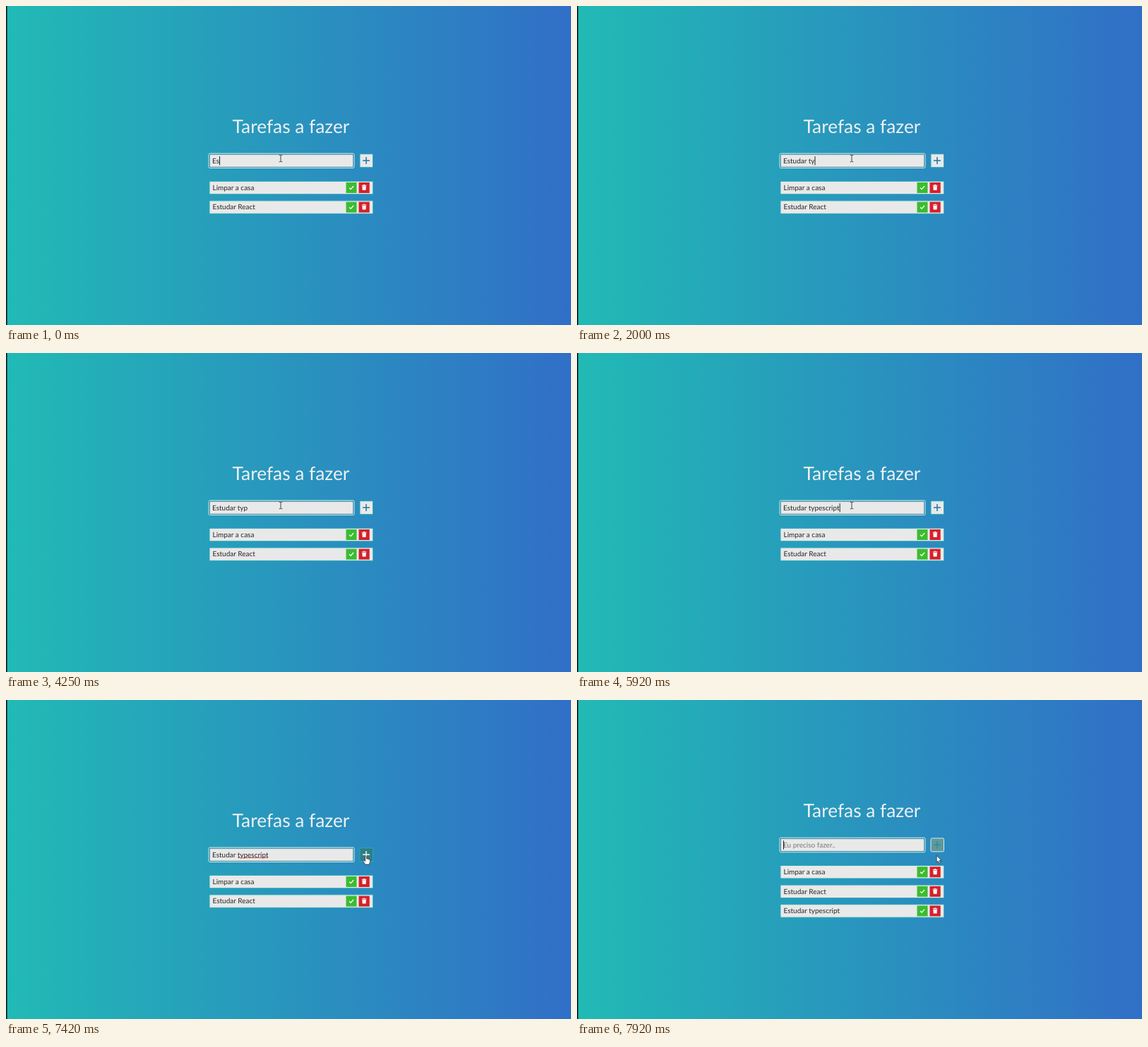
Recreate the animation shown at these times as an HTML page. Size 800 by 452 pixels, loop 8 s.

```html
<!DOCTYPE html>
<html lang="pt">
<head>
<meta charset="utf-8">
<title>Tarefas a fazer</title>
<style>
  html, body { margin: 0; width: 100%; height: 100%; overflow: hidden; }
  body { background: linear-gradient(to right, #21bab5, #316fc7); }
  svg { display: block; width: 800px; height: 452px; }
  text { font: 10px Lato, "Open Sans", sans-serif; fill: #262626; white-space: pre; text-rendering: geometricPrecision; }
  #title { font-size: 26.3px; fill: #eef1f2; text-anchor: middle; }
  .icon { fill: none; stroke: #fff; }
</style>
</head>
<body>
<svg viewBox="0 0 800 452">
  <rect width="1.6" height="452" fill="#06191c"/>
  <g id="app">
    <text id="title" x="403.5" y="179.5">Tarefas a fazer</text>
    <rect x="287.5" y="209" width="205" height="20.5" fill="#e9e9e9" stroke="#23a9b5" stroke-width=".8"/>
    <g id="ring" fill="none">
      <rect x="287" y="209" width="206" height="20.5" rx="1.5" stroke="#d9eeee"/>
      <rect x="288.2" y="210.2" width="203.6" height="18.2" stroke="#287f9c"/>
    </g>
    <text id="entry" x="292" y="222.6"></text>
    <path id="spell" d="M328 223.6H371" stroke="#d8484c" stroke-width=".9"/>
    <rect id="caret" y="213" width="1" height="12.5" fill="#222"/>
    <rect id="button" x="501" y="209.7" width="18.5" height="19" stroke-width="1"/>
    <path id="plus" d="M505 219H515M510 214V224" stroke-width="1.5"/>
    <g id="list"></g>
  </g>
  <g id="pointer">
    <path id="beam" d="M-2.3 -4.8Q-.2 -4.8 0 -4Q.2 -4.8 2.3 -4.8M0 -4V4M-2.3 4.8Q-.2 4.8 0 4Q.2 4.8 2.3 4.8" fill="none" stroke="#333" stroke-width=".9"/>
    <path id="arrow" d="M-.8 0V9.6L1.4 7.6L2.9 10.9L4.5 10.2L3 7H6Z" fill="#fff" stroke="#222" stroke-width=".7"/>
    <path id="hand" d="M-1 6V.8Q0 -.6 1 .8V4Q2.2 3.4 2.8 4.4Q4 4 4.4 5Q5.7 4.8 5.8 6.2V8.5L4.6 12H-1L-3.8 7.5Q-4.2 5.8 -2.8 6L-1 7.6Z" fill="#fff" stroke="#222" stroke-width=".7"/>
  </g>
</svg>
<script>
const LOOP = 8000, ADDED = 7915;
const el = id => document.getElementById(id);
const set = (id, attrs) => { for (const k in attrs) el(id).setAttribute(k, attrs[k]); };
const show = (id, on) => set(id, { visibility: on ? 'visible' : 'hidden' });
const clamp = v => Math.min(1, Math.max(0, v));

el('list').innerHTML = ['Limpar a casa', 'Estudar React', 'Estudar typescript'].map((label, i) => `
  <g id="item${i}" transform="translate(0 ${i * 27.6})">
    <rect x="288" y="248.3" width="231.7" height="18.4" fill="#e9e9e9" stroke="#23a9b5" stroke-width=".9"/>
    <text x="292.5" y="260.9">${label}</text>
    <rect x="481.5" y="250" width="15" height="15" fill="#3cbc30"/>
    <path class="icon" d="M486 257.6L488.1 259.6L492.1 255.2" stroke-width="1.3"/>
    <rect x="499.5" y="250" width="15.2" height="15" fill="#d5202a"/>
    <path class="icon" d="M503.8 254.3H510.4M506 253.5H508.2" stroke-width="1"/>
    <path d="M504.3 255.3H509.9L509.5 261H504.7Z" fill="#fff"/>
  </g>`).join('');

// [start, text, caret visible]
const typing = [
  [0, 'Es', 1], [80, 'Est', 1], [250, 'Estu', 1], [500, 'Estud', 1], [580, 'Estuda', 1],
  [830, 'Estudar', 1], [1000, 'Estudar ', 1], [1500, 'Estudar ', 0], [1750, 'Estudar t', 1],
  [2000, 'Estudar ty', 1], [2250, 'Estudar typ', 1], [2670, 'Estudar type', 1],
  [3250, 'Estudar type', 0], [3580, 'Estudar typ', 0], [3750, 'Estudar typ', 1],
  [4250, 'Estudar typ', 0], [4500, 'Estudar type', 1], [4750, 'Estudar types', 1],
  [5000, 'Estudar typescr', 1], [5170, 'Estudar typesc', 1], [5500, 'Estudar typescri', 1],
  [5750, 'Estudar typescrip', 1], [5920, 'Estudar typescript', 1], [6420, 'Estudar typescript', 0],
  [ADDED, '', 1]
];

// [time, x, y]
const path = [
  [0, 389, 216], [6667, 389, 216], [6750, 400, 216], [6917, 465, 216.5], [7000, 488, 217.5],
  [7083, 501, 219.5], [7250, 509, 222], [7500, 510, 220.5], [LOOP, 510, 220.5]
];

function pointerAt(t) {
  const i = path.findIndex(p => p[0] > t), a = path[i - 1], b = path[i];
  const k = (t - a[0]) / (b[0] - a[0]);
  return [a[1] + (b[1] - a[1]) * k, a[2] + (b[2] - a[2]) * k];
}

function mix(a, b, k) {
  return `rgb(${a.map((v, i) => Math.round(v + (b[i] - v) * k))})`;
}

function draw(t) {
  const [, text, caret] = typing.findLast(s => s[0] <= t);
  const added = t >= ADDED, pressed = t >= 7660;
  const entry = el('entry');
  entry.textContent = text;
  set('caret', { x: 292 + entry.getComputedTextLength() });
  if (added) {
    entry.textContent = 'Eu preciso fazer..';
  }
  entry.style.fill = added ? '#777' : '#262626';
  show('caret', caret);
  show('ring', !pressed || added);
  show('spell', t >= 6745 && !pressed);
  show('item2', added);
  set('app', { transform: `translate(0 ${added ? -13.8 : 0})` });

  const hover = added ? .75 : clamp((t - 7070) / 200);
  set('button', {
    fill: mix([233, 233, 233], [47, 126, 133], hover),
    stroke: pressed ? '#dcebea' : '#23a9b5',
    rx: pressed ? 1.5 : 0
  });
  set('plus', { stroke: added ? '#2c8f96' : mix([33, 116, 166], [245, 250, 250], hover) });

  const [x, y] = pointerAt(Math.floor((t + 5) * .012) / .012);
  set('pointer', { transform: `translate(${x} ${y})` });
  const shape = x < 493 ? 'beam' : x < 500 || added ? 'arrow' : 'hand';
  for (const id of ['beam', 'arrow', 'hand']) show(id, id === shape);
}

const start = performance.now();
function tick() {
  draw((performance.now() - start) % LOOP);
  requestAnimationFrame(tick);
}
tick();
</script>
</body>
</html>
```
